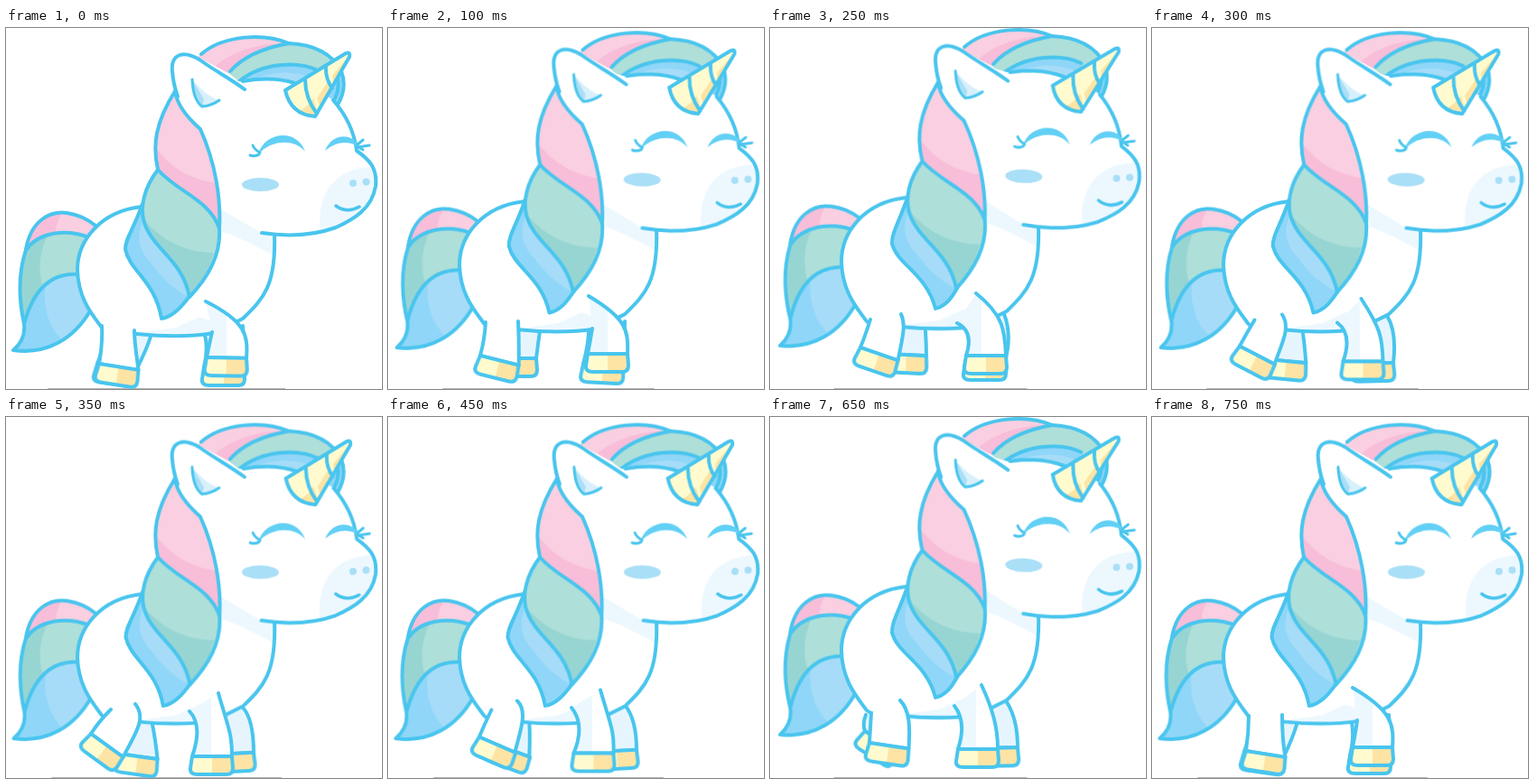
Recreate the animation shown at these times as an HTML page without scripts. Size 416 by 400 pixels, loop 800 ms.

```html
<!DOCTYPE html>
<html lang="en">
<head>
<meta charset="utf-8">
<title>Walking unicorn</title>
<style>
html, body { margin: 0; width: 100%; height: 100%; overflow: hidden; background: #fff; }
svg { display: block; width: 100vw; height: 100vh; }
.line { fill: none; stroke: #49c5ee; stroke-width: 4; stroke-linecap: round; stroke-linejoin: round; }
.white { fill: #fff; }
.shade { fill: #edf8fe; }
.pink { fill: #f9cfe1; } .pink2 { fill: #f8bdd8; }
.green { fill: #aedfd9; } .green2 { fill: #97d5d3; }
.blue { fill: #a6dcf8; } .blue2 { fill: #8fd6f8; }
.cream { fill: #fffbcf; } .gold { fill: #fde4a5; }
.soft { fill: #a9dff7; }
.ink { fill: #62d0f5; }

/* Two bobs per walk cycle, sampled at 20 poses a second */
.bob, .lock {
  animation: bob .4s infinite linear(0 0% 12.5%, .146 12.5% 25%, .5 25% 37.5%, .854 37.5% 50%,
    1 50% 62.5%, .854 62.5% 75%, .5 75% 87.5%, .146 87.5% 100%);
}
.lock { animation-name: lock; }
@keyframes bob { to { transform: var(--up); } }
@keyframes lock { to { d: path("M153,185 C142,216 135,226 135.5,238 C142,262 174,270 185,309 C196,306 202,298 208,286 C199,241 163,236 153,185 Z"); } }
.ground { --up: scaleX(.781); transform-origin: 177.5px 0; }
.tail { --up: matrix(1, -.047, .03, 1, -7, -5.5); }
.body { --up: matrix(1, 0, 0, 1.016, 0, -14.9); }
.mane { --up: matrix(1, 0, .023, 1, -3.1, -11); }
.head { --up: matrix(1, .045, -.045, 1, 7, -23.5); }
.hair { --up: translate(-1px, -9.5px); }
.ear { --up: translate(-1px, -11px); }
.horn { --up: matrix(1, 0, -.06, 1, 8.5, -6); }

.step { animation: .8s steps(2) infinite; }
.far { fill: #e6f5fd; }
.nb { animation-name: nearBack; } .nbh { animation-name: nearBackHoof; }
.nf { animation-name: nearFront; fill: url(#legShade); } .nfh { animation-name: nearFrontHoof; }
.fb { animation-name: farBack; } .fbh { animation-name: farBackHoof; }
.ff { animation-name: farFront; } .ffh { animation-name: farFrontHoof; }

@keyframes nearBack {
  0%, 100% { d: path("M106,330 Q107,350 103,372 L146.5,379 C145,365 142,350 142,335"); }
  12.5% { d: path("M108,326 Q107,345 102,363 L144.7,373.6 C145,355 145,345 144,325"); animation-timing-function: steps(3); }
  31.25% { d: path("M111,323 Q105,342 100,354 L141.6,368.3 C146,345 151,330 145,317"); }
  43.75% { d: path("M116,324 Q103,337 94,351 L129.6,376.9 C140,355 157,335 143,318"); animation-timing-function: steps(4); }
  68.75% { d: path("M113,325 Q110,345 108,358 L151.2,366.4 C151,345 154,318 143,311"); }
  81.25% { d: path("M112,328 Q111,345 110,361 L153.5,367.5 C155,345 155,325 144,314"); }
  93.75% { d: path("M107,331 Q107,350 104,370 L147.5,377 C145,363 144,350 144,330"); animation-timing-function: steps(1); }
}
@keyframes nearBackHoof {
  0%, 100% { transform: translate(103px, 372px) rotate(9deg); }
  12.5% { transform: translate(102px, 363px) rotate(14deg); animation-timing-function: steps(3); }
  31.25% { transform: translate(100px, 354px) rotate(19deg); }
  43.75% { transform: translate(94px, 351px) rotate(36deg); animation-timing-function: steps(4); }
  68.75% { transform: translate(108px, 358px) rotate(11deg); }
  81.25% { transform: translate(110px, 361px) rotate(8.5deg); }
  93.75% { transform: translate(104px, 370px) rotate(9deg); animation-timing-function: steps(1); }
}
@keyframes nearFront {
  0%, 100% { d: path("M228,337 Q226,345 222,365 L266,366 C268,340 265,325 221,303"); }
  12.5% { d: path("M226,333 Q224,345 221,361 L265,361 C266,335 264,322 222,297"); animation-timing-function: steps(3); }
  31.25% { d: path("M207,327 Q226,336 217,363 L261,363 C260,335 258,318 228,294"); }
  43.75% { d: path("M203,326 Q218,342 206,376 L250,376 C250,350 246,345 235,306"); animation-timing-function: steps(4); }
  68.75% { d: path("M203,318 Q219,340 205,369 L249,369 C251,345 247,340 235,299"); }
  81.25% { d: path("M204,320 Q218,338 208,368 L252,368 C252,345 247,325 234,297"); }
  93.75% { d: path("M227,336 Q226,345 222,366 L266,366 C268,340 265,325 222,300"); animation-timing-function: steps(1); }
}
@keyframes nearFrontHoof {
  0%, 100% { transform: translate(222px, 365px) rotate(1deg); }
  12.5% { transform: translate(221px, 361px) rotate(0deg); animation-timing-function: steps(3); }
  31.25% { transform: translate(217px, 363px) rotate(0deg); }
  43.75% { transform: translate(206px, 376px) rotate(0deg); animation-timing-function: steps(4); }
  68.75% { transform: translate(205px, 369px) rotate(0deg); }
  81.25% { transform: translate(208px, 368px) rotate(0deg); }
  93.75% { transform: translate(222px, 366px) rotate(0deg); animation-timing-function: steps(1); }
}
@keyframes farBack {
  0%, 100% { d: path("M120,335 Q108,350 101,372 L144.6,378 Q156,355 160,342"); }
  12.5% { d: path("M130,335 Q125,350 120,366 L164,366 Q166,350 168,336"); animation-timing-function: steps(3); }
  31.25% { d: path("M138,330 Q132,345 129,361 L173,363 Q173,350 172,336"); }
  43.75% { d: path("M130,335 Q126,350 124,373 L167.6,379 Q165,355 162,341"); animation-timing-function: steps(4); }
  68.75% { d: path("M107,330 Q106,338 108,350 L145,374 Q150,345 150,330"); }
  81.25% { d: path("M106,330 Q102,340 105,348 L142,372 Q150,345 150,330"); }
  93.75% { d: path("M120,335 Q108,350 102,371 L145.6,377 Q156,355 160,341"); animation-timing-function: steps(1); }
}
@keyframes farBackHoof {
  0%, 100% { transform: translate(101px, 372px) rotate(8deg); }
  12.5% { transform: translate(120px, 366px) rotate(0deg); animation-timing-function: steps(3); }
  31.25% { transform: translate(129px, 361px) rotate(3deg); }
  43.75% { transform: translate(124px, 373px) rotate(8deg); animation-timing-function: steps(4); }
  68.75% { transform: translate(108px, 350px) rotate(33deg); }
  81.25% { transform: translate(105px, 348px) rotate(33deg); }
  93.75% { transform: translate(102px, 371px) rotate(8deg); animation-timing-function: steps(1); }
}
@keyframes farFront {
  0%, 100% { d: path("M220,340 Q224,355 219,376 L263,376 Q264,350 262,330"); }
  12.5% { d: path("M222,335 Q222,350 216,372 L260,374 Q262,350 262,325"); animation-timing-function: steps(3); }
  31.25% { d: path("M225,330 Q222,350 216,370 L260,370 Q268,340 259,317"); }
  43.75% { d: path("M235,330 Q235,350 230,374 L274,372 Q274,335 262,322"); animation-timing-function: steps(4); }
  68.75% { d: path("M235,325 Q235,350 232,368 L276,366 Q276,335 262,316"); }
  81.25% { d: path("M235,325 Q233,350 230,367 L274,366 Q274,335 262,316"); }
  93.75% { d: path("M221,339 Q224,355 219,375 L263,375 Q264,350 262,330"); animation-timing-function: steps(1); }
}
@keyframes farFrontHoof {
  0%, 100% { transform: translate(219px, 376px) rotate(0deg); }
  12.5% { transform: translate(216px, 372px) rotate(3deg); animation-timing-function: steps(3); }
  31.25% { transform: translate(216px, 370px) rotate(0deg); }
  43.75% { transform: translate(230px, 374px) rotate(-3deg); animation-timing-function: steps(4); }
  68.75% { transform: translate(232px, 368px) rotate(-3deg); }
  81.25% { transform: translate(230px, 367px) rotate(-1deg); }
  93.75% { transform: translate(219px, 375px) rotate(0deg); animation-timing-function: steps(1); }
}
</style>
</head>
<body>
<svg viewBox="0 0 416 400">
  <defs>
    <linearGradient id="legShade">
      <stop offset=".5" stop-color="#edf8fe"/><stop offset=".5" stop-color="#fff"/>
    </linearGradient>
    <g id="hoof">
      <path class="cream" d="M0,0 H44 L45,13 Q45,20 38,20 H6 Q-3,20 -2,13 Z"/>
      <path class="gold" d="M22,0 H44 L45,13 Q45,20 38,20 H22 Z"/>
      <path class="line" d="M0,0 H44 L45,13 Q45,20 38,20 H6 Q-3,20 -2,13 Z"/>
    </g>
  </defs>

  <path class="bob ground" d="M46,399.5 H309" stroke="#b5b5b5"/>

  <g class="bob tail">
    <path class="pink" d="M22,245 C28,212 50,202 68,205 Q86,208 99,219 L90,232 C66,222 36,226 22,245"/>
    <path class="pink2" d="M22,245 C28,215 44,204 62,205 Q55,215 55,227 Q34,230 22,245"/>
    <path class="green" d="M22,246 C36,226 66,222 92,232 L82,273 C50,270 30,290 20,328 C14,300 14,270 22,246"/>
    <path class="green2" d="M22,246 Q32,233 47,228 C36,250 36,268 40,285 Q27,299 20,328 C14,300 14,270 22,246"/>
    <path class="blue2" d="M20,328 C30,290 50,270 84,273 L96,312 C75,345 45,362 8,357 Q22,345 20,328"/>
    <path class="blue" d="M44,284 Q60,271 84,273 L96,312 Q82,335 62,346 C46,330 40,305 44,284"/>
    <path class="line" d="M22,245 C28,212 50,202 68,205 Q86,208 99,219 M92,232 C66,222 36,226 22,246 C14,270 14,300 20,328 C30,290 50,270 82,273 M20,328 Q22,345 8,357 C45,362 75,345 94,312"/>
  </g>

  <path class="line far step fb"/>
  <use href="#hoof" class="step fbh"/>
  <path class="line far step ff"/>
  <use href="#hoof" class="step ffh"/>

  <g class="bob body">
    <path class="white" d="M150,198 C105,203 79,235 79,268 C80,300 95,317 106,332 Q112,340 145,339 C175,342 205,342 230,338 L262,322 C285,300 299,275 297,200 Z"/>
    <path class="shade" d="M150,337 L188,332 L214,320 L242,331 L230,338 Q190,342 150,338 M234,180 Q252,212 283,227 H297 L296,252 C270,238 250,228 236,225"/>
    <path class="line" d="M150,198 C105,203 79,235 79,268 C80,300 95,317 106,332 Q112,340 145,339 C175,342 205,342 230,338 L262,322 C285,300 299,285 297,228"/>
  </g>

  <path class="line white step nb" style="fill:#fff"/>
  <use href="#hoof" class="step nbh"/>
  <path class="line step nf" style="fill:url(#legShade)"/>
  <use href="#hoof" class="step nfh"/>

  <g class="bob hair">
    <path class="pink" d="M212,32 C240,8 285,5 313,17 C285,22 262,32 246,50 Z"/>
    <path class="pink2" d="M232,42 C250,26 280,16 313,17 C285,22 262,32 246,50 Z"/>
    <path class="green" d="M246,50 C262,28 290,16 318,17 Q356,21 373,52 L340,62 L262,62 Z"/>
    <path class="blue2" d="M258,60 C285,36 335,36 356,56 Q376,40 374,66 Q373,78 368,86 L340,80 L262,68 Z"/>
    <path class="blue" d="M275,56 Q310,43 340,56 L330,66 Z"/>
    <path class="line" d="M216,29 C240,8 285,5 313,17 C285,22 262,32 248,48 M313,17 Q356,19 371,48 Q378,66 367,85 M258,59 C285,37 325,37 345,47 M366,52 Q370,65 364,78"/>
  </g>

  <g class="bob head">
    <path class="white" d="M187,70 Q200,42 262,60 C290,53 330,56 362,80 Q384,105 388,136 C402,146 411,155 409,175 C405,200 385,212 365,221 C340,230 310,231 283,227 L236,200 L205,105 Z"/>
    <path class="shade" d="M403,154 C370,155 342,178 348,226 C380,219 407,200 409,175 Q409,162 403,154"/>
    <path class="line" d="M262,59 C285,55 305,56 322,62 M362,80 Q384,105 388,136 C402,146 411,155 409,175 C405,200 385,212 365,221 C340,230 310,231 283,227"/>
    <path class="ink" d="M279,140 C285,115 322,110 331,137 C319,122 293,124 279,140 M353,136 C360,116 384,115 392,133 C381,124 366,125 353,136"/>
    <path class="line" stroke-width="3" style="stroke-width:3" d="M281,138 Q275,135 273,130 M280,140 Q276,143 270,141 M390,132 L402,130 M389,129 L395,124 M390,132 L395,135"/>
    <ellipse class="soft" cx="281.5" cy="173.500" rx="20.500" ry="7.500"/>
    <circle class="soft" cx="384" cy="172" r="4"/>
    <circle class="soft" cx="398.500" cy="170.500" r="4"/>
    <path class="line" style="stroke-width:3.500" d="M365,197 Q377,206 391,198"/>
  </g>

  <g class="bob horn">
    <path class="cream" d="M376,28 L309,69 Q315,96 342,98 L380,32 Z"/>
    <path class="gold" d="M324,92 Q333,88 340,78 L345,94 L342,98 Q330,97 324,92 M344,78 L357,58 L361,68 L348,90 M361,53 L380,30 L363,64"/>
    <path class="line" d="M376,28 L309,69 Q315,96 342,98 L380,32 Q381,26 376,28 M331,57 Q331,78 344,95 M354,42 Q353,56 361,67"/>
  </g>

  <path class="bob lock blue2 line" style="fill:#8fd6f8" d="M151,195 C140,226 132,233 132,245 C137,270 165,280 172,322 C185,320 195,308 204,296 C195,250 160,245 151,195 Z"/>
  <g class="bob mane">
    <path class="blue" d="M152,212 C144,230 146,245 160,260 C172,277 184,288 200,297 L204,285 Z"/>
    <path class="pink" d="M187,70 C165,105 162,130 168,157 C190,182 225,190 236,222 C238,190 232,150 215,112 Q190,90 187,70"/>
    <path class="pink2" d="M166,133 C183,156 205,168 233,172 Q237,195 236,222 C225,190 190,182 168,157 Z"/>
    <path class="green" d="M168,157 C152,178 149,198 152,212 C160,245 195,255 203,298 C225,275 238,250 236,222 C225,190 190,182 168,157"/>
    <path class="green2" d="M153,213 C175,238 202,249 230,249 Q222,277 203,298 C195,255 160,245 153,213"/>
    <path class="line" d="M187,70 C165,105 162,130 168,157 C190,182 225,190 236,222 C238,190 232,150 215,112 Q190,90 187,70 M168,157 C152,178 149,198 152,212 C160,245 195,255 203,298 C225,275 238,250 236,222"/>
  </g>

  <g class="bob ear">
    <path class="line" style="fill:#fff" d="M264,68 C245,54 232,48 214,35 C196,24 182,29 184,48 Q185,62 190,76"/>
    <path fill="#d8f0fc" d="M206,57 Q222,76 236,80 Q226,87 217,88 Q207,80 206,57"/>
    <path class="soft" d="M206,57 L219,79 L217,88 Q207,80 206,57"/>
    <path class="line" style="stroke-width:3" d="M206,57 Q207,80 217,87 Q228,86 236,80"/>
  </g>
</svg>
</body>
</html>
```
